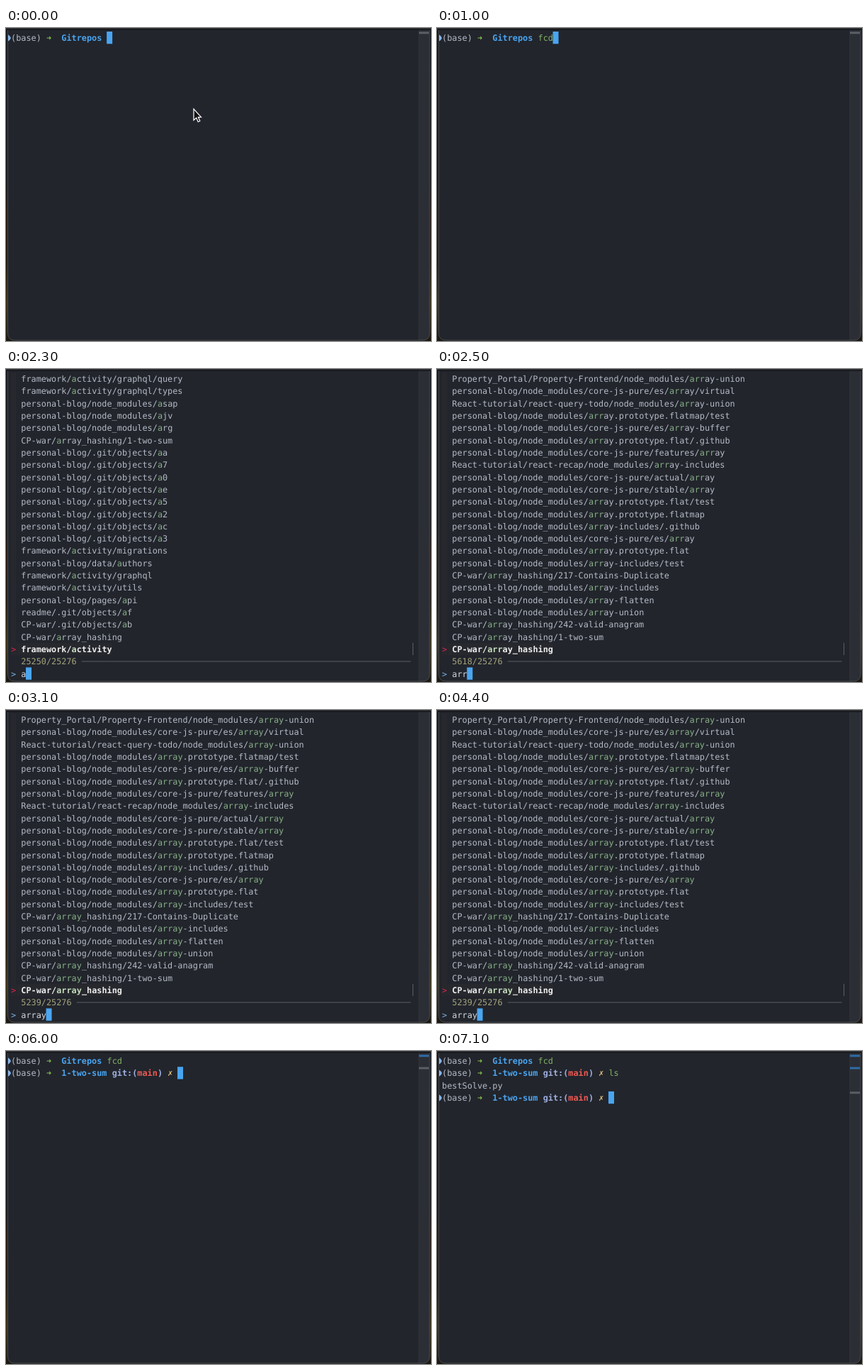
Animation, 600 px wide and 441 px high, one loop 7200 ms. Source, as an HTML page:

```html
<!DOCTYPE html>
<html lang="en">
<head>
<meta charset="utf-8">
<title>Fuzzy directory jump</title>
<style>
html, body { margin: 0; width: 100%; height: 100%; overflow: hidden; background: #14161a; }
svg { display: block; width: 600px; height: 441px; }
text {
  font: 11.85px "DejaVu Sans Mono", "Noto Sans Mono", monospace;
  text-rendering: geometricPrecision; white-space: pre; fill: #b4bac5;
}
.arrow, .dir, .git, .branch, .dirty, .sel, .selhit { font-weight: bold; }
.arrow { fill: #83b94f; }
.dir { fill: #4aa5f0; }
.git { fill: #9fb0e0; }
.branch { fill: #f05a52; }
.dirty { fill: #e5c07b; }
.cmd { fill: #84b266; }
.bad { fill: #e05561; }
.hit { fill: #87af87; }
.sel { fill: #eeeeee; }
.selhit { fill: #c3dcbc; }
.point { fill: #e0244f; }
.count { fill: #a3a37c; }
.ask { fill: #7fb0e0; }
.spin { fill: #afc71a; }
.query { fill: #d3d7de; }
.cursor { fill: #4aa5f0; }
.shade { fill: #26282d; }
.now { fill: #5b5e65; }
.past { fill: #2f6ba6; }
.mark { fill: #86b6ec; }
</style>
</head>
<body>
<svg viewBox="0 0 600 441">
  <defs>
    <linearGradient id="edge" x1="0" y1="0" x2="0" y2="1">
      <stop offset="0" stop-color="#15171c"/>
      <stop offset=".5" stop-color="#17171a"/>
      <stop offset=".6" stop-color="#29180f"/>
      <stop offset=".75" stop-color="#21190f"/>
      <stop offset=".88" stop-color="#3a2f13"/>
      <stop offset="1" stop-color="#1b1811"/>
    </linearGradient>
    <clipPath id="win"><path d="M2.5 0H598V430Q598 440 588 440H12.5Q2.5 440 2.5 430Z"/></clipPath>
  </defs>
  <rect width="600" height="441" fill="url(#edge)"/>
  <g clip-path="url(#win)">
    <rect width="600" height="441" fill="#22252c"/>
    <rect x="583" width="15" height="441" fill="#2b2e35"/>
    <rect x="582.5" y="3" width="1" height="438" fill="#33363d"/>
    <g id="screen"></g>
  </g>
  <path d="M2.5 2V430Q2.5 440 12.5 440H588Q598 440 598 430V2" fill="none" stroke="#474a50"/>
  <rect width="600" height="1.5" fill="#303236"/>
  <rect y="1.5" width="600" height="1.5" fill="#15171b"/>
  <path id="mouse" d="M265 114V130L268.7 126.6 271.2 132.2 273.8 131 271.4 125.6H275.5Z"
        fill="#111" stroke="#fff" stroke-width="1.2"/>
</svg>
<script>
const LOOP = 7200, CW = 7.134, LH = 17.31, TOTAL = 25276;
const screen = document.getElementById('screen');
const mouse = document.getElementById('mouse');

const colX = c => 7 + c * CW;
const rowY = r => 5 + r * LH;
const under = (base, names) => names.split(' ').map(n => base + n);

const MODS = 'personal-blog/node_modules/';
const BLOG = 'personal-blog/.git/objects/';
const HASH = 'CP-war/array_hashing';

const startList = [
  ...under('CP-war/.git/objects/', 'd9 9d 93 56 3c 04 3e 92 95 0d'),
  'CP-war/.git/objects', 'CP-war/.git',
  ...under(HASH, '/217-Contains-Duplicate /242-valid-anagram /1-two-sum'), HASH,
  'CP-war/DP', 'CP-war/Sorting', 'CP-war/Sliding Window', 'CP-war/Binary Search',
  'CP-war/Two Pointer', 'CP-war/linked-list', 'CP-war'
];
const aList = [
  ...under('framework/activity/graphql/', 'query types'),
  ...under(MODS, 'asap ajv arg'),
  HASH + '/1-two-sum',
  ...under(BLOG, 'aa a7 a0 ae a5 a2 ac a3'),
  'framework/activity/migrations', 'personal-blog/data/authors',
  ...under('framework/activity/', 'graphql utils'),
  'personal-blog/pages/api', 'readme/.git/objects/af', 'CP-war/.git/objects/ab',
  HASH, 'framework/activity'
];
const arrayList = [
  'Property_Portal/Property-Frontend/node_modules/array-union',
  MODS + 'core-js-pure/es/array/virtual',
  'React-tutorial/react-query-todo/node_modules/array-union',
  ...under(MODS, 'array.prototype.flatmap/test core-js-pure/es/array-buffer ' +
    'array.prototype.flat/.github core-js-pure/features/array'),
  'React-tutorial/react-recap/node_modules/array-includes',
  ...under(MODS, 'core-js-pure/actual/array core-js-pure/stable/array ' +
    'array.prototype.flat/test array.prototype.flatmap array-includes/.github ' +
    'core-js-pure/es/array array.prototype.flat array-includes/test'),
  HASH + '/217-Contains-Duplicate',
  ...under(MODS, 'array-includes array-flatten array-union'),
  HASH + '/242-valid-anagram', HASH + '/1-two-sum', HASH
];

const text = (row, col, str, cls = '') =>
  `<text class="${cls}" x="${colX(col)}" y="${rowY(row) + 13.1}">${str.replace('>', '&gt;')}</text>`;
const rect = (cls, x, y, w, h) =>
  `<rect class="${cls}" x="${x}" y="${y}" width="${w}" height="${h}"/>`;
const cursor = (row, col) => rect('cursor', colX(col) - .4, rowY(row), 8, LH);
const tick = (cls, row) => rect(cls, 583, rowY(row) + .3, 14, 3);

function prompt(row, dir, inRepo) {
  const y = rowY(row) + 9;
  return `<path class="mark" d="M2.5 ${y - 5}Q6 ${y - 3} 7 ${y}Q6 ${y + 3} 2.5 ${y + 5}Z"/>` +
    text(row, 0, '(base)') + text(row, 7, '➜', 'arrow') + text(row, 10, dir, 'dir') +
    (inRepo ? text(row, 20, 'git:(', 'git') + text(row, 25, 'main', 'branch') +
      text(row, 29, ')', 'git') + text(row, 31, '✗', 'dirty') : '');
}

function first(cmd) {
  return prompt(0, 'Gitrepos') + text(0, 19, cmd, cmd === 'f' ? 'bad' : 'cmd');
}

function shellStart(cmd) {
  return first(cmd) + cursor(0, 19 + cmd.length) + tick('now', 0);
}

function shellRepo(cmd, done) {
  const out = first('fcd') + tick('past', 0) +
    prompt(1, '1-two-sum', true) + text(1, 33, cmd, 'cmd');
  if (!done) return out + cursor(1, 33 + cmd.length) + tick('now', 1);
  return out + tick('past', 1) + text(2, 0, 'bestSolve.py') +
    prompt(3, '1-two-sum', true) + cursor(3, 33) + tick('now', 3);
}

function item(path, row, query, selected) {
  const at = query ? path.lastIndexOf('/' + query) + 1 : 0, end = at + query.length;
  const plain = selected ? 'sel' : '', hit = selected ? 'selhit' : 'hit';
  return (selected
    ? rect('shade', colX(1), rowY(row), (path.length + 1) * CW, LH) + text(row, 0, '>', 'point') : '') +
    text(row, 2, path.slice(0, at), plain) +
    text(row, 2 + at, path.slice(at, end), hit) +
    text(row, 2 + end, path.slice(end), plain);
}

function finder(list, query, count, selected = 22, spin = '') {
  const x = colX(3 + count.length);
  return rect('shade', colX(0), rowY(0), CW, LH * 23) +
    list.map((p, i) => item(p, i, query, i === selected)).join('') +
    rect('now', 574, rowY(22), 1, LH) +
    text(23, 0, spin, 'spin') + text(23, 2, count, 'count') +
    rect('now', x, 411.5, 571.5 - x, 1) +
    text(24, 0, '>', 'ask') + text(24, 2, query, 'query') + cursor(24, 2 + query.length);
}

function loading(t) {
  const read = Math.min(TOTAL, 10761 + (t - 1500) * 26);
  if (read === TOTAL) return finder(startList, '', `${TOTAL}/${TOTAL}`);
  const spin = '⠋⠙⠹⠸⠼⠴⠦⠧⠇⠏'[(t - 500) / 100 % 10];
  return finder(startList, '', `${Math.round(read * 9044 / 10761)}/${read}`, 22, spin);
}

const search = (query, hits, selected) => () =>
  finder(query === 'a' ? aList : arrayList, query, `${hits}/${TOTAL}`, selected);

// [start time, view]
const scenes = [
  [0, () => shellStart('')],
  [300, () => shellStart('f')],
  [400, () => shellStart('fc')],
  [600, () => shellStart('fcd')],
  [1100, loading],
  [2200, search('a', 25250)],
  [2400, search('ar', 15384)],
  [2500, search('arr', 5618)],
  [2700, search('arra', 5246)],
  [2900, search('array', 5239)],
  [4700, search('array', 5239, 21)],
  [5200, () => shellRepo('')],
  [6300, () => shellRepo('l')],
  [6400, () => shellRepo('ls')],
  [6700, () => shellRepo('ls', true)]
];

let shown = -1;
function draw() {
  const t = Math.floor(performance.now() % LOOP / 100) * 100;
  if (t !== shown) {
    shown = t;
    screen.innerHTML = scenes.filter(s => s[0] <= t).pop()[1](t);
    mouse.style.display = t < 300 ? '' : 'none';
  }
  requestAnimationFrame(draw);
}
draw();
</script>
</body>
</html>
```
